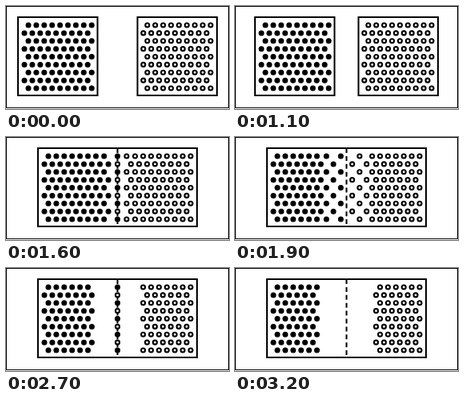
Write an HTML page with a canvas that moves like this. It is 279 px wide and 129 px high and loops after 4.7 s.

```html
<!DOCTYPE html>
<html lang="en">
<head>
<meta charset="utf-8">
<title>Junction</title>
<style>
  html, body { margin: 0; width: 100%; height: 100%; overflow: hidden; background: #fff; }
  canvas { display: block; width: 279px; height: 129px; }
</style>
</head>
<body>
<canvas id="stage" width="279" height="129"></canvas>
<script>
const ctx = document.getElementById('stage').getContext('2d');
const LOOP = 4700, STEP = 100, WIDTH = 279, CENTER = WIDTH / 2;
const ROWS = 9, COLUMNS = 9, PITCH = 9.9, GAP = 25;

// Columns drawn to the junction, nearest first.
const trips = [
  { start: 1500, end: 1600 },
  { start: 1500, end: 1800 },
  { start: 1500, end: 2000 },
  { start: 1500, end: 2200 },
  { start: 1500, end: 2700 },
  { start: 2700, end: 3100 }
];
const accelerate = p => p ** 2.4;

// Position within the joined left half, or null once the dot is gone.
function dotX(row, column, time) {
  const inset = row % 2;
  const home = (inset ? 48 : 53) + PITCH * column;
  const trip = trips[2 * (COLUMNS - 1 - column) + inset];
  if (!trip || time < trip.start) return home;
  if (time > trip.end) return null;
  const progress = (time - trip.start) / (trip.end - trip.start);
  return home + (CENTER - home) * accelerate(progress);
}

function drawDot(x, y, hollow) {
  ctx.beginPath();
  ctx.arc(x, y, hollow ? 2.5 : 3.5, 0, 2 * Math.PI);
  ctx.fillStyle = hollow ? '#fff' : '#000';
  ctx.fill();
  if (hollow) {
    ctx.lineWidth = 2.1;
    ctx.stroke();
  }
}

function drawLine(points, dash = []) {
  ctx.lineWidth = 2;
  ctx.setLineDash(dash);
  ctx.beginPath();
  points.forEach(([x, y]) => ctx.lineTo(x, y));
  ctx.stroke();
  ctx.setLineDash([]);
}

function drawBoxes(gap, joined) {
  const top = 14, bottom = 112;
  for (const side of [-1, 1]) {
    const inner = CENTER + side * gap;
    const outer = inner + side * 99.5;
    drawLine([[inner, top], [outer, top], [outer, bottom], [inner, bottom]]);
    if (!joined) drawLine([[inner, top - 1], [inner, bottom + 1]]);
  }
  if (joined) drawLine([[CENTER, top], [CENTER, bottom]], [6, 3.9]);
}

function draw(time) {
  const moves = Math.max(0, (time - 1000) / STEP + 1);
  const gap = Math.max(0, GAP - 5 * moves);
  ctx.fillStyle = '#fff';
  ctx.fillRect(0, 0, WIDTH, 129);
  ctx.strokeStyle = '#000';
  ctx.lineWidth = 1;
  ctx.strokeRect(0.5, 0.5, 278, 127);
  drawBoxes(gap, time >= 1500);

  for (let row = 0; row < ROWS; row++) {
    const y = 24 + 9.875 * row;
    for (let column = 0; column < COLUMNS; column++) {
      const solid = dotX(row, column, time);
      const ring = dotX(row + 1, column, time);
      if (solid !== null) drawDot(solid - gap, y, false);
      if (ring !== null) drawDot(WIDTH - ring + gap, y, true);
    }
  }
}

const origin = performance.now();
function tick() {
  const time = (performance.now() - origin) % LOOP;
  draw(Math.floor(time / STEP) * STEP);
  requestAnimationFrame(tick);
}
tick();
</script>
</body>
</html>
```
